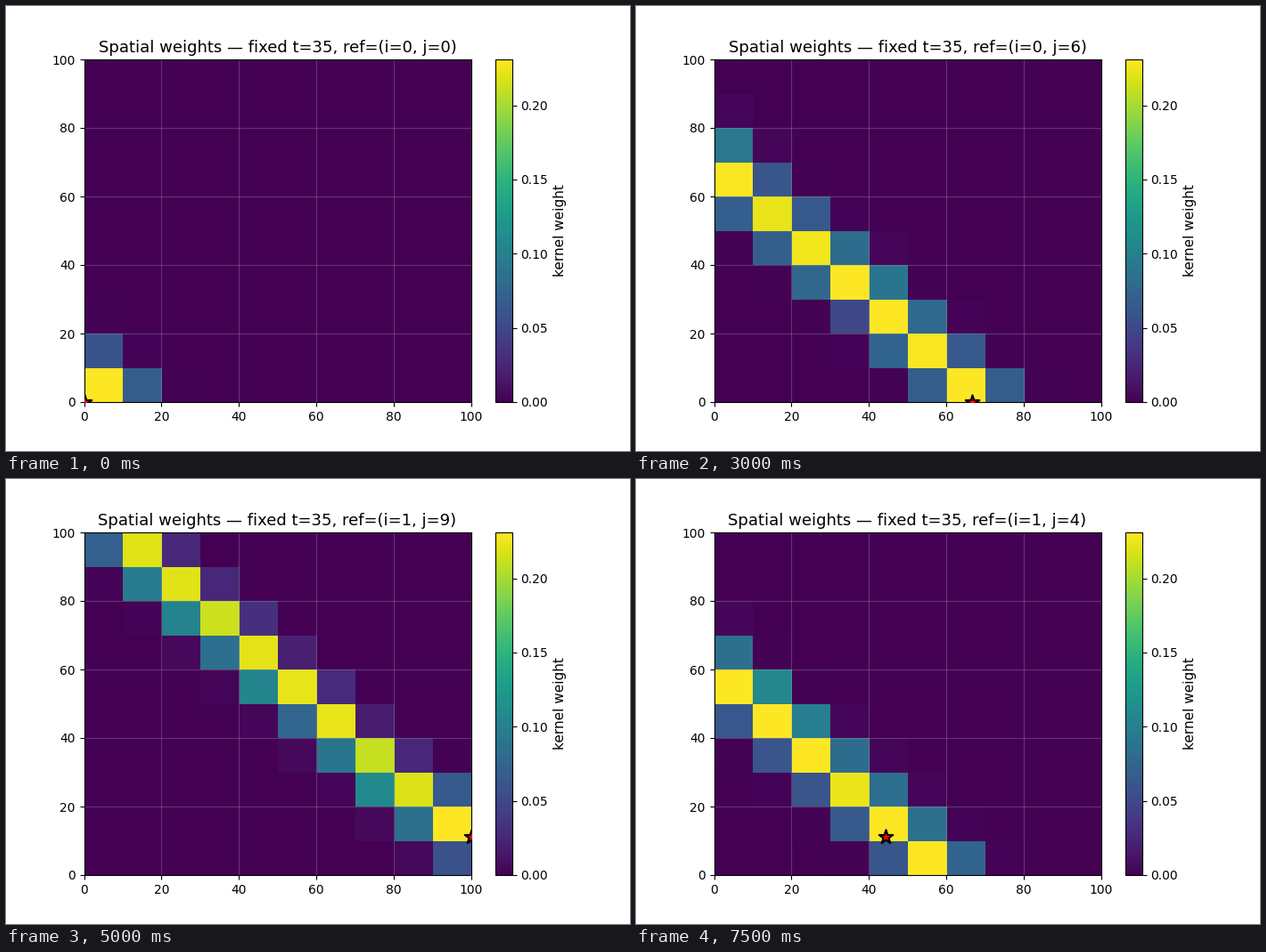
Recreate the animation shown at these times as a matplotlib script. Size 700 px wide and 500 px high, loop 8 s.

```python
import numpy as np
import matplotlib.pyplot as plt
from matplotlib.animation import FuncAnimation

N = 10
SIZE = 100
PEAK = 0.231
DECAY = 1.2
FRAMES = 16
STEP_MS = 500


def make_field():
    """A diagonal ramp, slightly uneven, that steepens past the middle."""
    rows, cols = np.indices((N, N))
    s = rows + cols
    near = np.exp(-rows)  # 1 on the bottom row, fading upwards
    noise = np.random.default_rng(4).uniform(-0.12, 0.12, (N, N))
    late = 0.12 * np.maximum(0, s - N + 1)
    edge = 0.28 * (cols == N - 1)
    return s + late - edge + 0.01 * cols * near + noise * (1 - near)


FIELD = make_field()


def reference(frame):
    """Walk the grid row by row, turning back at each end."""
    i, j = divmod(frame, N)
    return i, (N - 1 - j if i % 2 else j)


def weights(i, j):
    return PEAK * np.exp(-DECAY * (FIELD - FIELD[i, j]) ** 2)


fig, ax = plt.subplots(figsize=(7, 5), dpi=100)
image = ax.imshow(weights(0, 0), origin="lower", extent=(0, SIZE, 0, SIZE),
                  aspect="auto", interpolation="nearest",
                  cmap="viridis", vmin=0, vmax=PEAK)
bar = fig.colorbar(image, ax=ax)
bar.set_label("kernel weight", fontsize=11)
ax.grid(alpha=0.3)
star = ax.scatter([0], [0], s=140, marker="*", color="red",
                  edgecolors="black", linewidths=1.5, zorder=5)
ax.set_xlim(0, SIZE)
ax.set_ylim(0, SIZE)
title = ax.set_title("", fontsize=13)


def update(frame):
    i, j = reference(frame)
    image.set_data(weights(i, j))
    star.set_offsets([[j * SIZE / (N - 1), i * SIZE / (N - 1)]])
    title.set_text(f"Spatial weights — fixed t=35, ref=(i={i}, j={j})")
    return image, star, title


anim = FuncAnimation(fig, update, frames=FRAMES, interval=STEP_MS,
                     repeat=True, repeat_delay=0)
plt.show()
```
